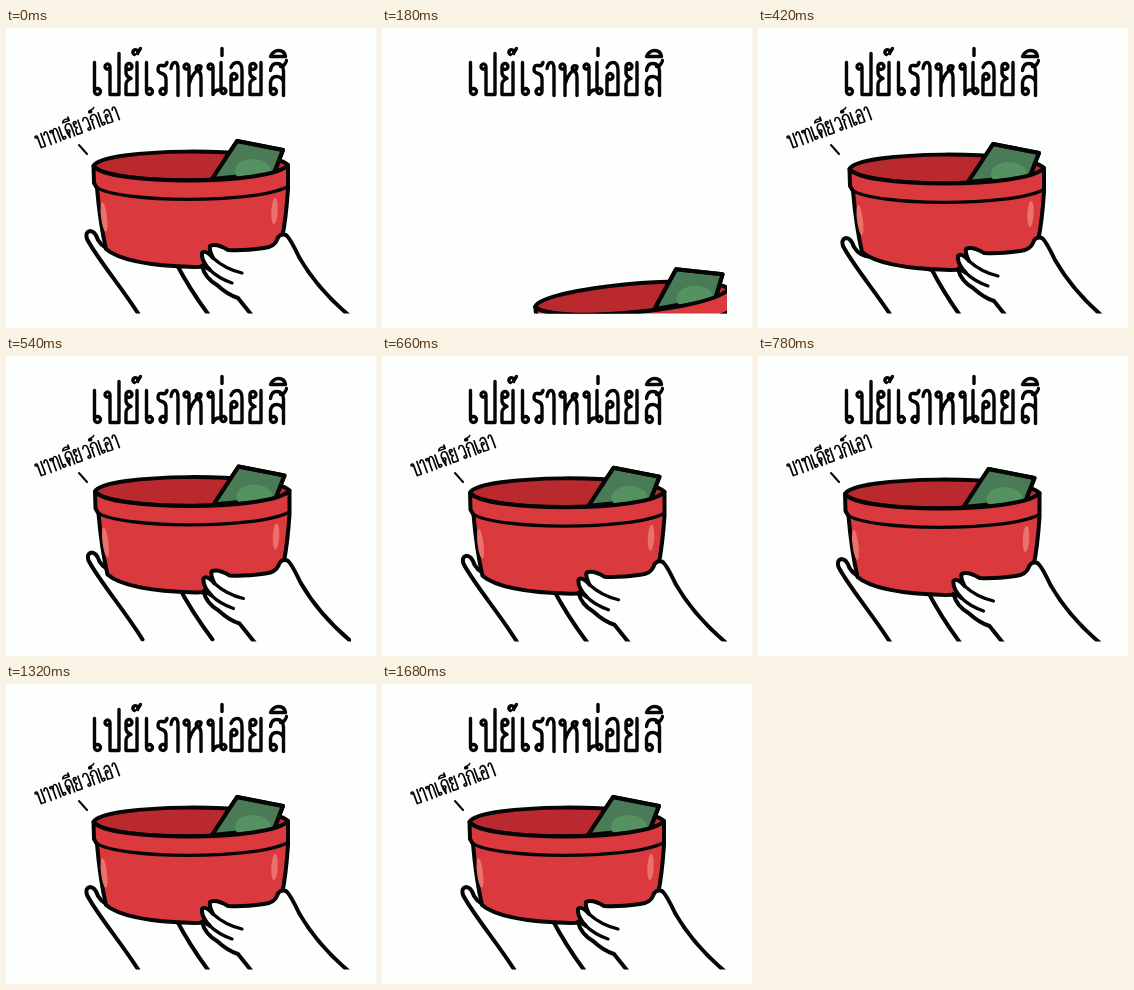
These frames come from a looping animation (370x300 px, 1860 ms). An HTML page:

```html
<!DOCTYPE html>
<html lang="th">
<head>
<meta charset="utf-8">
<style>
  html, body { margin: 0; width: 100%; height: 100%; overflow: hidden; background: #fdfffc; }
  svg { display: block; width: 100%; height: 100%; }
  path { stroke: #050505; stroke-width: 4; stroke-linecap: round; stroke-linejoin: round; fill: none; }
  .lettering path { stroke-width: 3.4; }
  .small path { stroke-width: 3.5; }
  .thin { stroke-width: 3.2; }
  .skin { fill: #fdfffc; }
  .red { fill: #da3a3e; }
  .inside { fill: #b9292d; }
  .note { fill: #4a7b57; }
  .shine { fill: #ec716d; }
</style>
</head>
<body>
<svg viewBox="0 0 370 300" role="img" aria-label="เปย์เราหน่อยสิ บาทเดียวก็เอา">
  <defs>
    <clipPath id="window"><path d="M0 0H345V285.5H0Z"/></clipPath>
    <clipPath id="noteShape"><path d="M206 151L231 113 277 122 268 145Z"/></clipPath>
  </defs>
  <g id="title" class="lettering" transform="translate(86.5 34.5)"></g>
  <g id="aside">
    <g id="caption" class="lettering small" transform="translate(28 108) rotate(-20) scale(.485 .42)"></g>
    <path d="M73 117L81 126" style="stroke-width:2"/>
  </g>
  <g clip-path="url(#window)">
    <g id="leftHand">
      <path class="skin" d="M135 290C118 262 92 232 81 211Q79 204 84 203Q89 203 92 212Q98 222 110 222L170 235Q184 262 205 290"/>
    </g>
    <g id="bowl">
      <path class="inside" d="M87.500 138C96 120 262 118 282 137C272 156 102 158 87.500 138Z"/>
      <path class="note" d="M206 151L231 113 277 122 268 145Z"/>
      <ellipse cx="247" cy="143" rx="18" ry="12" fill="#569162" clip-path="url(#noteShape)"/>
      <path d="M206 151L231 113 277 122 268 145"/>
      <path class="red" d="M87.500 138C102 158 266 157 282 137L282 161Q280 191 276 210C267 231 225 239 188 239C150 238 115 234 100 221Q94 195 91 160L88 155Z"/>
      <path class="thin" d="M90 159C112 175 247 176 281 159"/>
      <ellipse class="shine" cx="98" cy="189" rx="3" ry="15" transform="rotate(-7 98 189)"/>
      <ellipse class="shine" cx="268.500" cy="183" rx="3.200" ry="13" transform="rotate(3 268.500 183)"/>
    </g>
    <g id="rightHand">
      <path class="skin" d="M346 290Q312 262 293 229Q284 210 280 207Q273 205 271 212Q268 219 258 220Q236 223 222 222Q210 215 204 218Q203 222 207 230Q199 221 196 225Q195 233 204 242Q196 236 196 238Q199 250 211 257Q222 267 232 270L248 290"/>
      <path class="thin" d="M207 230Q219 241 236 245M204 242Q212 250 226 255"/>
    </g>
  </g>
</svg>
<script>
const $ = id => document.getElementById(id);

// Each letter: advance width and pen strokes. Marks have no advance.
const headLoop = "M6 4A2.500 2.500 0 1 0 6 4.1";
const glyphs = {
  "เ": [11.5, "M2 0V29A3 3 0 1 0 5 26Q2 26 2 29"],
  "บ": [19.5, headLoop + "V32H15V0"],
  "ป": [20, headLoop + "V32H15V-9"],
  "ย": [20.5, "M8 4A3 3 0 1 0 2 4Q2 8 2 11Q3 15 7 16Q2 18 2 22V32H13V0M2 4A3 3 0 0 0 8 4"],
  "ร": [14, "M11 0Q10 4 6 3Q2 2 2 7Q2 10 6 11Q10 12 10 17V29A3 3 0 1 1 7 26Q10 26 10 29"],
  "า": [13, "M1 6Q2 0 5 0Q8 0 8 7V33"],
  "ห": [24, headLoop + "V33M6 22Q9 12 14 8M18 4A2.500 2.500 0 1 0 14 8Q18 9 18 15V33M14 8Q18 8 18 4"],
  "น": [22, headLoop + "V32Q9 26 14 28A2.500 2.500 0 1 0 16 26Q14 26 14 28V0"],
  "อ": [19, "M2 14A3 3 0 1 1 2 14.1V32H13V8Q13 0 8 0Q4 0 2 5"],
  "ส": [19, "M2 8Q3 1 8 1Q15 1 15 9V33M12 4Q17 3 18 -2M8 29A3 3 0 1 1 2 29A3 3 0 0 1 8 29M2 29V20Q3 14 8 14Q13 14 15 19"],
  "ท": [20, headLoop + "V33M6 14Q8 0 12 0Q16 0 16 7V33"],
  "ด": [19, "M9 18A3 3 0 1 0 7 20L5 33Q2 22 2 10Q3 0 9 0Q15 0 15 9V33M7 20Q9 20 9 18"],
  "ว": [16, "M2 6Q3 0 7 0Q12 0 12 8V29A3 3 0 1 1 9 26Q12 26 12 29"],
  "ก": [19, "M3 33V15L6 12 2 9Q3 0 9 0Q15 0 15 8V33"],
  "ิ": [0, "M-17 -6Q-14 -12 -9 -12Q-3 -12 -2 -6Z"],
  "ี": [0, "M-18 -6Q-16 -12 -11 -12Q-5 -12 -4 -6ZM-4 -6V-15"],
  "่": [0, "M-7 -14V-7"],
  "็": [0, "M-14 -6A3 3 0 1 1 -11 -6Q-16 -13 -9 -12Q-5 -12 -3 -15"],
  "์": [0, "M-10 -8A2.500 2.500 0 1 1 -7 -9Q-6 -11 -4 -14"]
};

function letter(group, text) {
  let x = 0;
  group.innerHTML = [...text].map(char => {
    const [advance, strokes] = glyphs[char];
    const path = `<path d="${strokes}" transform="translate(${x} 0)"/>`;
    x += advance;
    return path;
  }).join("");
}

letter($("title"), "เปย์เราหน่อยสิ");
letter($("caption"), "บาทเดียวก็เอา");

const LOOP = 1860, STEP = 60;

// time, x, y, tilt, vertical squash, extra drop of the left hand
const poses = [
  [60, 135, 245, -8, .97, 60],
  [120, 105, 195, -7, .97, 60],
  [180, 69, 132, -5, 1, 50],
  [240, 40, 76, -2, .98, 42],
  [300, 19, 36, 0, .96, 30],
  [360, 9, 14, 0, .98, 14],
  [420, 4, 3, 0, 1, 4],
  [480, 2.5, -2, 0, 1, 0],
  [540, 1.5, -2.5, 0, 1, -4],
  [780, -.5, 0, 0, 1, 0],
  [1320, 0, 0, 0, 1, 0]
];

function poseAt(time) {
  const next = poses.findIndex(pose => pose[0] > time);
  if (time < poses[0][0] || next < 0) return poses.at(-1);
  const from = poses[next - 1], to = poses[next];
  const mix = (time - from[0]) / (to[0] - from[0]);
  return from.map((value, i) => value + (to[i] - value) * mix);
}

function draw(now) {
  const time = Math.floor(now % LOOP / STEP) * STEP;
  const [, x, y, tilt, squash, drop] = poseAt(time);
  const place = (id, dy) => $(id).setAttribute("transform",
    `translate(${x} ${y + dy + 112 * (1 - squash)}) scale(1 ${squash}) rotate(${tilt} 185 180)`);
  place("bowl", 0);
  place("rightHand", 0);
  place("leftHand", drop);
  $("aside").style.visibility = time >= 60 && time < 420 ? "hidden" : "visible";
}

function tick(now) {
  draw(now);
  requestAnimationFrame(tick);
}
draw(0);
requestAnimationFrame(tick);
</script>
</body>
</html>
```
